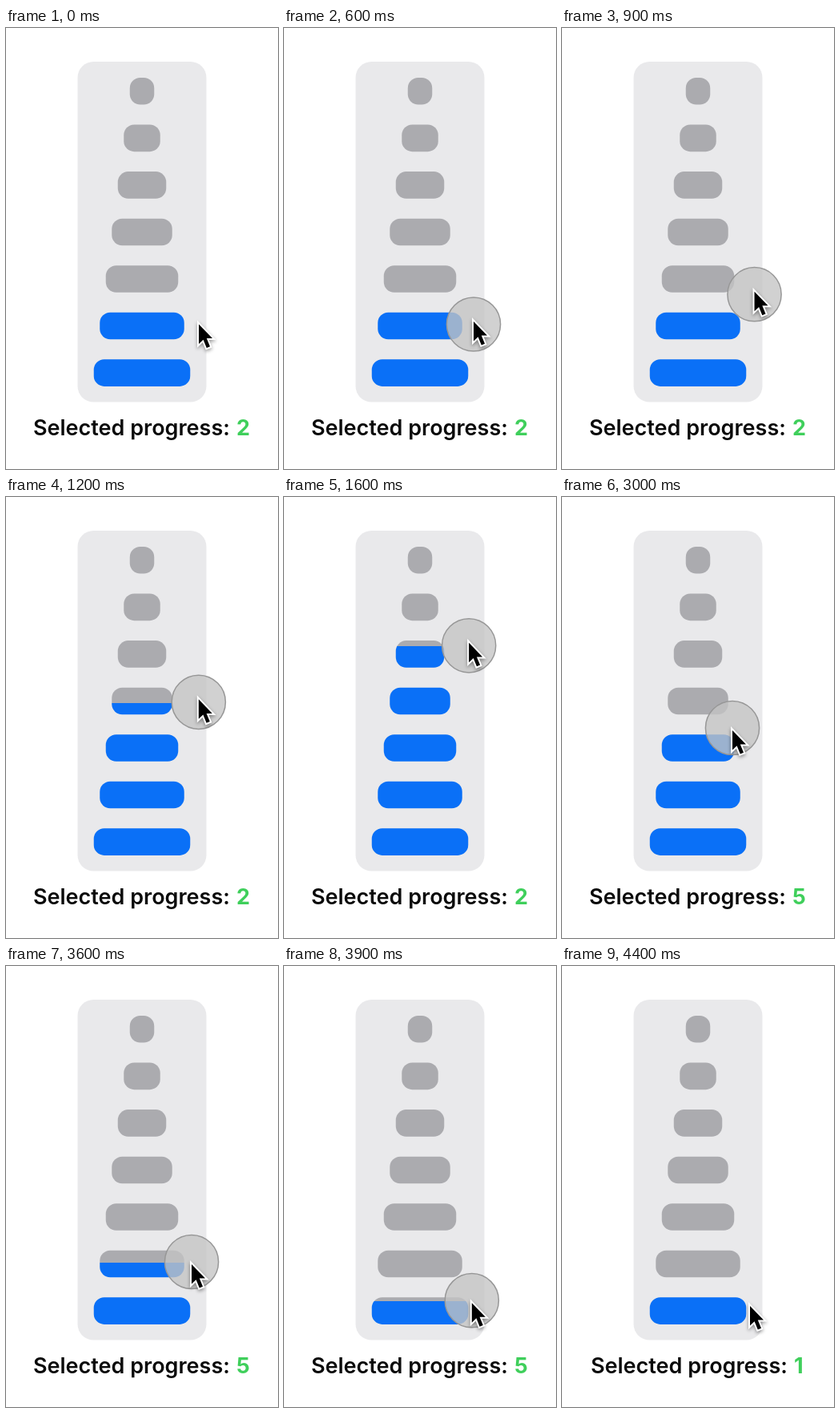
Animation, 340 px wide and 550 px high, one loop 4.5 s. Source, as an HTML page with a canvas:

```html
<!DOCTYPE html>
<html lang="en">
<head>
<meta charset="utf-8">
<title>Stepped progress</title>
<style>
  html, body { margin: 0; width: 100%; height: 100%; overflow: hidden; background: #fff; }
  canvas { display: block; width: 340px; height: 550px; }
</style>
</head>
<body>
<canvas id="stage"></canvas>
<script>
const WIDTH = 340, HEIGHT = 550, LOOP = 4500, STEP = 100;
const BARS = 7, BAR_TOP = 62, BAR_PITCH = 58.55, BAR_HEIGHT = 33.6;
const FONT = 'Inter, "Open Sans", sans-serif';

const canvas = document.getElementById('stage');
const ctx = canvas.getContext('2d');
const ratio = window.devicePixelRatio || 1;
canvas.width = WIDTH * ratio;
canvas.height = HEIGHT * ratio;
ctx.scale(ratio, ratio);

// Places the finger eases between; bow bends the way there sideways.
const stops = [
  { at: 0, x: 241, y: 373 },
  { at: 600, x: 237, y: 369.5 },
  { at: 1640, x: 231, y: 184.5, bow: 8 },
  { at: 2780, x: 230, y: 185 },
  { at: 3000, x: 213, y: 288 },
  { at: 3500, x: 231, y: 368 },
  { at: 3600, x: 232, y: 369 },
  { at: 3960, x: 235, y: 421 }
];

function ease(t, from, to) {
  const u = Math.min(1, Math.max(0, (t - from) / (to - from)));
  return u * u * (3 - 2 * u);
}

function touchAt(t) {
  let { x, y } = stops[0];
  for (let i = 1; i < stops.length; i++) {
    const a = stops[i - 1], b = stops[i], u = ease(t, a.at, b.at);
    x += (b.x - a.x) * u + (b.bow || 0) * Math.sin(Math.PI * u);
    y += (b.y - a.y) * u;
  }
  return { x, y };
}

// The arrow leads the finger upwards, then trails a little on the way down.
function pointerAt(t) {
  const { x, y } = touchAt(t);
  return { x: x - 0.5, y: y - 5.5 + 6.5 * ease(t, 2400, 2800) };
}

const barTop = i => BAR_TOP + i * BAR_PITCH;
const within = (t, from, to) => t >= from && t < to;
const selectedAt = t => t < 2100 ? 2 : t < 4200 ? 5 : 1;
const touching = t => within(t, 400, 2100) || within(t, 2800, 4200);
const dragging = t => within(t, 700, 2100) || within(t, 2900, 4200);

function drawBars(fillTop) {
  for (let i = 0; i < BARS; i++) {
    const w = 30.5 + 15 * i, x = 170 - w / 2, y = barTop(i);
    const edge = Math.min(1, Math.max(0, (fillTop - y) / BAR_HEIGHT));
    const paint = ctx.createLinearGradient(0, y, 0, y + BAR_HEIGHT);
    paint.addColorStop(edge, '#ababaf');
    paint.addColorStop(edge, '#0a70f7');
    fillBox(x, y, w, BAR_HEIGHT, 13, edge === 1 ? '#ababaf' : edge === 0 ? '#0a70f7' : paint);
  }
}

function fillBox(x, y, w, h, r, paint) {
  ctx.beginPath();
  ctx.roundRect(x, y, w, h, r);
  ctx.fillStyle = paint;
  ctx.fill();
}

function drawText(text, x, weight, color) {
  ctx.font = `${weight} 27px ${FONT}`;
  ctx.fillStyle = color;
  ctx.fillText(text, x, 508);
}

function drawLabel(value) {
  const left = value === 1 ? 36 : 34;
  drawText('Selected progress:', left, 600, '#0a0a0a');
  drawText(value, left + 254, 700, '#3fcf5b');
}

function drawTouch({ x, y }) {
  ctx.beginPath();
  ctx.arc(x, y, 33.6, 0, Math.PI * 2);
  ctx.fillStyle = 'rgba(196,196,196,.78)';
  ctx.fill();
  ctx.strokeStyle = '#979797';
  ctx.lineWidth = 1.5;
  ctx.stroke();
}

const arrow = new Path2D('M0 0V24.5L5.6 19.2L9.8 29.5L14 27.8L9.8 17.6H17Z');

function drawPointer({ x, y }) {
  ctx.save();
  ctx.translate(x + 0.5, y + 2);
  ctx.save();
  ctx.shadowColor = 'rgba(0,0,0,.4)';
  ctx.shadowBlur = 4 * ratio;
  ctx.shadowOffsetY = 2 * ratio;
  ctx.strokeStyle = '#fff';
  ctx.lineWidth = 4;
  ctx.stroke(arrow);
  ctx.restore();
  ctx.fillStyle = '#000';
  ctx.fill(arrow);
  ctx.restore();
}

function draw(t) {
  const value = selectedAt(t), touch = touchAt(t);
  ctx.fillStyle = '#fff';
  ctx.fillRect(0, 0, WIDTH, HEIGHT);
  fillBox(89.5, 42, 161, 424.5, 20, '#e9e9eb');
  drawBars(dragging(t) ? touch.y + 1 : barTop(BARS - value));
  drawLabel(value);
  if (touching(t)) drawTouch(touch);
  drawPointer(pointerAt(t));
}

const start = performance.now();
function tick() {
  const t = (performance.now() - start) % LOOP;
  draw(Math.floor(t / STEP) * STEP);
  requestAnimationFrame(tick);
}
tick();
</script>
</body>
</html>
```
